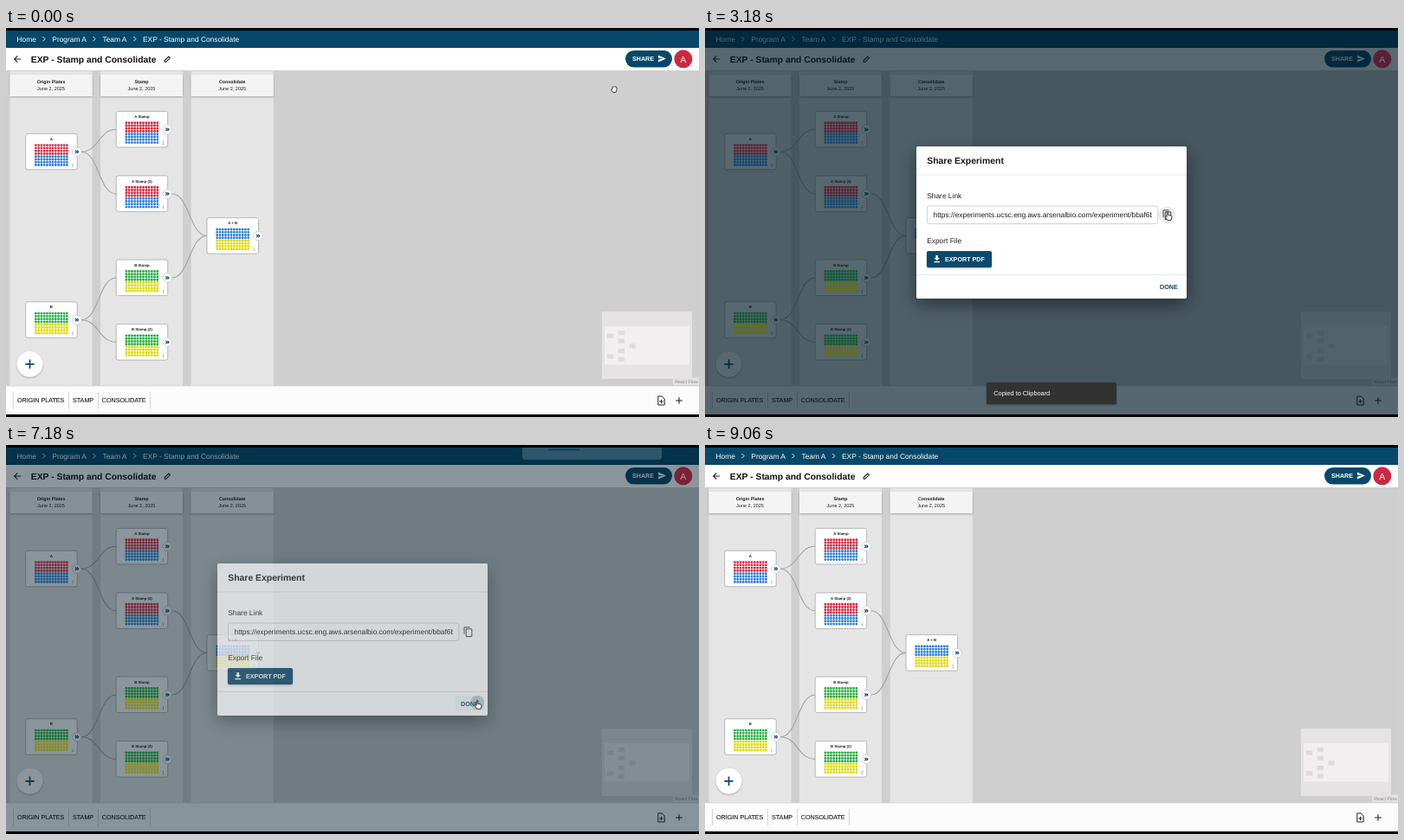
An HTML page that plays this animation: 800x450 px, repeating every 9.09 s.

```html
<!DOCTYPE html>
<html lang="en">
<head>
<meta charset="utf-8">
<title>Share experiment</title>
<style>
  html, body { margin: 0; width: 100%; height: 100%; overflow: hidden; background: #000; }
  svg { display: block; width: 100vw; height: 100vh; }
  text { font-family: "Liberation Sans", Arial, sans-serif; text-rendering: geometricPrecision; white-space: pre; }
</style>
</head>
<body>
<svg id="stage" viewBox="0 0 800 450"></svg>
<script>
const LOOP = 9090;
const NAVY = '#07486a', INK = '#1c1c1c';
const RED = '#d5283f', BLUE = '#2b80d0', GREEN = '#1fae3c', YELLOW = '#dfd90f';

// Markup helpers
const rect = (x, y, w, h, fill, more = '') =>
  `<rect x="${x}" y="${y}" width="${w}" height="${h}" fill="${fill}" ${more}/>`;
const disc = (x, y, r, fill, more = '') =>
  `<circle cx="${x}" cy="${y}" r="${r}" fill="${fill}" ${more}/>`;
const line = (d, color, width = 1, more = '') =>
  `<path d="${d}" fill="none" stroke="${color}" stroke-width="${width}" ${more}/>`;
const text = (x, y, size, str, fill = INK, more = '') =>
  `<text x="${x}" y="${y}" font-size="${size}" fill="${fill}" ${more}>${str}</text>`;
const group = (id, body, more = '') => `<g id="${id}" ${more}>${body}</g>`;
const BOLD = 'font-weight="700"', MID = 'text-anchor="middle"';

const plates = [
  ['A', 22.7, 122.3, RED, BLUE],
  ['A Stamp', 127.2, 96.4, RED, BLUE],
  ['A Stamp (2)', 127.2, 170.9, RED, BLUE],
  ['A + B', 232, 219.6, BLUE, YELLOW],
  ['B', 22.7, 316.8, GREEN, YELLOW],
  ['B Stamp', 127.2, 268.1, GREEN, YELLOW],
  ['B Stamp (2)', 127.2, 342.6, GREEN, YELLOW],
];

function wells([, x, y, top, bottom]) {
  const rows = from => Array.from({ length: 4 }, (_, i) =>
    `M${x + 11.7} ${y + 13.3 + (from + i) * 3.27}h36.1`).join('');
  const dots = 'stroke-dasharray="0 3.27" stroke-linecap="round"';
  return line(rows(0), top, 2.9, dots) + line(rows(4), bottom, 2.9, dots);
}

function card([name, x, y]) {
  return rect(x, y, 59.5, 41.5, '#fff', 'rx="2.2" stroke="#a9a9a9" stroke-width=".8"') +
    text(x + 29.7, y + 7.6, 4.3, name, INK, `${BOLD} ${MID}`) +
    line(`M${x + 54.2} ${y + 34.6}v4`, '#555', 0.8, 'stroke-dasharray=".8 .7"') +
    disc(x + 59, y + 20.9, 5.3, '#fff', 'stroke="#c4c4c4" stroke-width=".7"') +
    line(`M${x + 57.1} ${y + 19.2}l1.7 1.7l-1.7 1.7m2.1 -3.4l1.7 1.7l-1.7 1.7`, NAVY, 1.1);
}

const edge = (x1, y1, x2, y2) => {
  const m = (x1 + x2) / 2;
  return line(`M${x1} ${y1}C${m} ${y1} ${m} ${y2} ${x2} ${y2}`, '#a3a3a3', 1.1);
};

const column = (x, name) =>
  rect(x, 50, 95, 364, '#e5e5e5') +
  rect(x, 54, 95, 25, '#f5f4f5', 'filter="url(#soft)"') +
  text(x + 47.5, 64.3, 5.3, name, INK, `${BOLD} ${MID}`) +
  text(x + 47.5, 72.2, 5.5, 'June 2, 2025', INK, MID);

const chevron = x => line(`M${x} 10l2.6 2.6l-2.6 2.6`, '#e8eef2', 1);

const navBar = rect(0, 3, 800, 20.3, NAVY) +
  [[12.5, 'Home'], [53.3, 'Program A'], [111.5, 'Team A'], [158, 'EXP - Stamp and Consolidate']]
    .map(([x, s]) => text(x, 15.6, 8.4, s, '#fff')).join('') +
  [42.5, 100.5, 147.3].map(chevron).join('');

const titleBar = rect(0, 23, 800, 26.5, '#fff') + rect(0, 49, 800, 0.8, '#c4c4c4') +
  line('M17.2 36H9.6m3.7 -3.7L9.6 36l3.7 3.7', '#222', 1.1) +
  text(28.8, 39.6, 10.35, 'EXP - Stamp and Consolidate', '#111', BOLD) +
  line('M183.2 39.2v-1.6l4.6 -4.6l1.6 1.6l-4.6 4.6z', '#222', 1.1) +
  rect(715, 26, 54, 19.5, NAVY, 'id="share" rx="9.75"') +
  text(723, 38.3, 7.15, 'SHARE', '#fff', BOLD) +
  '<path d="M753 31.6l9 4l-9 4v-3.1l6 -.9l-6 -.9z" fill="#fff"/>';

const avatar = disc(781.8, 35.8, 10.5, '#cc2840') +
  text(781.8, 39.6, 10.3, 'A', '#fff', MID);

const mapNodes = [[694, 353.5], [706.8, 350], [706.8, 359.5], [719.6, 365.3],
  [706.8, 371], [706.8, 380.5], [694, 377.3]];
const miniMap = rect(688, 328, 104, 78, '#e5e3e4') + rect(691, 345, 98, 44.5, '#f1eff0') +
  mapNodes.map(([x, y]) => rect(x, y, 7.3, 5.2, '#dfdadb')).join('') +
  rect(770, 404.5, 30, 9, '#e2e2e2') +
  text(772.3, 410.6, 5.3, 'React Flow', '#8a8a8a');

const bottomBar = rect(0, 414, 800, 33, '#fcfcfc') + rect(0, 413.6, 800, 0.8, '#d2d2d2') +
  [8.5, 72.5, 106.5, 166.3].map(x => rect(x - 0.4, 421, 0.8, 19.5, '#c9c9c9')).join('') +
  [[13, 'ORIGIN PLATES'], [77, 'STAMP'], [110.8, 'CONSOLIDATE']]
    .map(([x, s]) => text(x, 433.4, 7.17, s, INK, 'stroke="#1c1c1c" stroke-width=".12"')).join('') +
  line('M752.8 426h4.4l3 3v7h-7.4zM756.5 429.8v4.4m-2.2 -2.2h4.4', '#222', 1) +
  line('M773.2 431h7.6m-3.8 -3.8v7.6', '#222', 1.1);

const fab = disc(27.5, 388.8, 14.8, '#fff', 'filter="url(#soft)"') +
  line('M22.3 388.8h10.4m-5.2 -5.2v10.4', NAVY, 1.7);

const board = rect(0, 49, 800, 365, '#cfcfcf') +
  column(4.5, 'Origin Plates') + column(109, 'Stamp') + column(213.7, 'Consolidate') +
  edge(87, 143.2, 127.2, 117.3) + edge(87, 143.2, 127.2, 191.8) +
  edge(87, 337.7, 127.2, 289) + edge(87, 337.7, 127.2, 363.4) +
  edge(191.5, 191.8, 232, 240.4) + edge(191.5, 289, 232, 240.4) +
  plates.map(card).join('');

const allWells = plates.map(wells).join('');

const dialog =
  rect(244, 137, 312, 176, '#fff', 'rx="2" filter="url(#deep)"') +
  text(256.2, 157, 10.45, 'Share Experiment', '#1a1a1a', BOLD) +
  rect(244, 169.6, 312, 0.8, '#e3e3e3') +
  text(256.2, 197, 8.4, 'Share Link', '#222') +
  rect(256.4, 206, 266.4, 20.4, '#fff', 'rx="2" stroke="#c6c6c6" stroke-width=".8"') +
  text(263.5, 218.8, 8.4, 'https://experiments.ucsc.eng.aws.arsenalbio.com/experiment/bbaf6b', INK, 'clip-path="url(#field)"') +
  disc(533.2, 216.2, 10, '#000', 'id="copyHover" opacity="0"') +
  line('M529 218.8v-8h6.6M531.2 212.8h6.6v8.8h-6.6z', '#444', 1) +
  text(256.2, 249, 8.4, 'Export File', '#222') +
  rect(256, 258, 75, 19, NAVY, 'id="exportBtn" rx="2" filter="url(#soft)"') +
  '<path d="M266.4 263h2.6v3h2l-3.3 3.2l-3.3 -3.2h2zM264.4 270.1h6.6v1.1h-6.6z" fill="#fff"/>' +
  text(277, 269.8, 7.2, 'EXPORT PDF', '#fff', BOLD) +
  rect(244, 285.2, 312, 0.8, '#e3e3e3') +
  rect(519, 290, 33, 18, NAVY, 'id="doneHover" rx="2" opacity="0"') +
  disc(544, 298, 8, NAVY, 'id="ripple" opacity="0" clip-path="url(#doneBox)"') +
  text(525, 301.6, 7.2, 'DONE', NAVY, BOLD);

const toast = rect(325, 410, 150, 25.3, '#323232', 'rx="2" filter="url(#soft)"') +
  text(333.3, 425, 7.35, 'Copied to Clipboard', '#fff');

const bubble = '<path d="M596 3h161v10.5q0 3.5 -3.5 3.5h-154q-3.5 0 -3.5 -3.5z" fill="#e9eff5"/>' +
  rect(626, 4.5, 36, 2, '#3973b5', 'rx="1"');

// Pointer shapes, drawn around their own centre
const shape = (id, d) =>
  `<path id="${id}" d="${d}" fill="#fff" stroke="#111" stroke-width=".8" stroke-linejoin="round" display="none"/>`;
const pointers =
  shape('arrow', 'M-2 -3.6V2.4L-.6 1.2L.4 3.5L1.5 3L.5 .8H2.3z') +
  shape('finger', 'M-1.8 -4.8q.8 -.7 1.5 0V-1.2l3 .6q1.4 .4 1.2 1.8L3 4.8H-1.2L-3.8 1q0 -1 1 -.9l1 .8z') +
  shape('grab', 'M-1.9 -2.6q.6 -.8 1.2 -.2q.6 -.9 1.3 -.1q.7 -.6 1.2 .2q1 -.3 1.1 .7V.9L2 3.4H-1.4L-3.4 .4q.2 -.9 1.2 -.3z');

const stage = document.getElementById('stage');
stage.innerHTML = `<defs>
  <filter id="soft" x="-20%" y="-20%" width="140%" height="160%"><feDropShadow dx="0" dy="1" stdDeviation="1.2" flood-opacity=".3"/></filter>
  <filter id="deep" x="-15%" y="-25%" width="130%" height="160%"><feDropShadow dx="0" dy="7" stdDeviation="10" flood-opacity=".45"/></filter>
  <clipPath id="field"><rect x="263" y="207" width="253" height="18"/></clipPath>
  <clipPath id="doneBox"><rect x="519" y="290" width="33" height="18" rx="2"/></clipPath>
</defs>` + rect(0, 0, 800, 450, '#000') +
  navBar + titleBar + board + allWells + miniMap + bottomBar + fab + avatar +
  group('dim', rect(0, 3, 800, 444, '#001b28', 'opacity=".66"') +
    `<g opacity=".15">${allWells}${avatar}</g>`) +
  group('dialog', dialog) + group('toast', toast) + group('bubble', bubble) +
  group('pointer', pointers);

const el = id => document.getElementById(id);
const set = (id, name, value) => el(id).setAttribute(name, value);
const clamp = v => Math.max(0, Math.min(1, v));
const ease = v => { const p = clamp(v); return p * p * (3 - 2 * p); };
const fade = (t, start, inMs, end, outMs) =>
  ease((t - start) / inMs) * (1 - ease((t - end) / outMs));
const within = (t, a, b) => t >= a && t < b;

// time, x, y, pointer shape from then on
const path = [
  [0, 702, 71, 'grab'], [90, 705, 68, 'grab'], [230, 723, 49, 'arrow'], [320, 733, 41, 'finger'],
  [430, 737, 38, 'finger'], [700, 737, 38, 'arrow'], [1270, 736, 39, 'arrow'],
  [1390, 730.5, 51.5, 'arrow'], [1750, 640, 136, 'arrow'], [2050, 556, 201, 'arrow'],
  [2170, 540, 213, 'finger'], [2300, 535, 217.5, 'finger'], [3750, 535, 217.5, 'finger'],
  [3850, 520, 222, 'arrow'], [4300, 340, 261, 'arrow'], [4360, 328, 264, 'finger'],
  [4550, 304, 268.5, 'finger'], [5500, 304, 268.5, 'finger'], [5620, 332, 272, 'arrow'],
  [6350, 519, 297, 'finger'], [6550, 545, 300.5, 'finger'], [7320, 545, 300.5, 'grab'],
  [7560, 545, 299, 'grab'], [8180, 563, 157, 'grab'], [8500, 588, 49, 'arrow'],
  [8680, 600, -10, 'arrow'], [LOOP, 600, -10, 'arrow'],
];

function movePointer(t) {
  const i = path.findIndex(p => p[0] > t) - 1;
  const [t0, x0, y0, kind] = path[i], [t1, x1, y1] = path[i + 1];
  const p = (t - t0) / (t1 - t0);
  set('pointer', 'transform', `translate(${x0 + (x1 - x0) * p} ${y0 + (y1 - y0) * p})`);
  for (const id of ['arrow', 'finger', 'grab']) set(id, 'display', id === kind ? 'inline' : 'none');
}

function draw(now) {
  const t = now % LOOP;
  const open = fade(t, 620, 225, 7110, 195);
  set('dim', 'opacity', open);
  set('dialog', 'opacity', open);
  set('toast', 'opacity', fade(t, 2650, 225, 4600, 195));
  set('bubble', 'opacity', fade(t, 5600, 150, 7000, 250));
  set('share', 'fill', within(t, 320, 700) ? '#04304a' : NAVY);
  set('exportBtn', 'fill', within(t, 4360, 5600) ? '#042c42' : NAVY);
  set('copyHover', 'opacity', 0.07 * fade(t, 2150, 150, 3800, 150));
  set('doneHover', 'opacity', 0.05 * fade(t, 6350, 150, 7320, 50));
  set('ripple', 'opacity', 0.25 * fade(t, 7080, 60, 7200, 120));
  set('ripple', 'r', 4 + 14 * clamp((t - 7130) / 180));
  movePointer(t);
  requestAnimationFrame(() => draw(performance.now() - start));
}

const start = performance.now();
draw(0);
</script>
</body>
</html>
```
